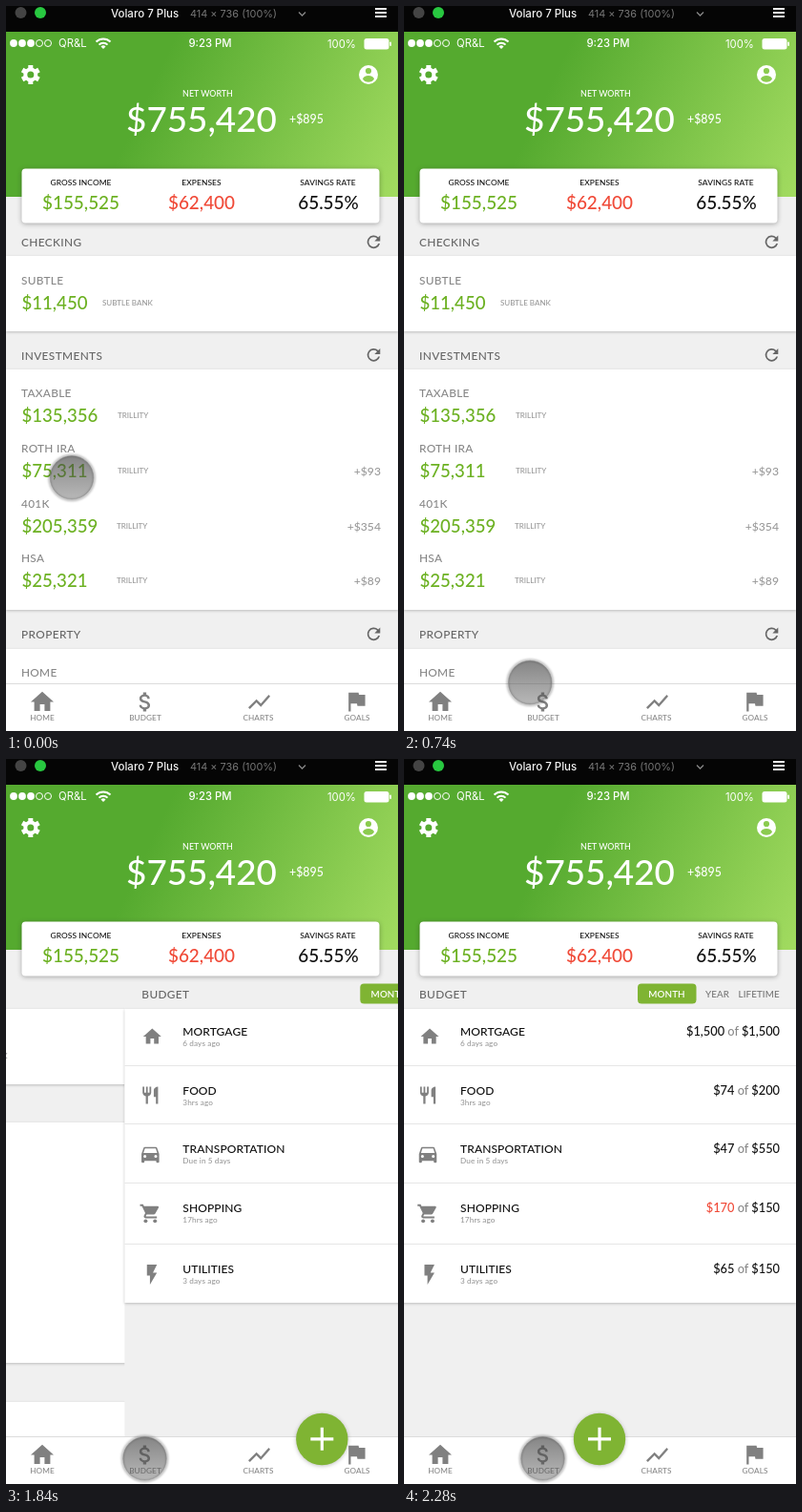
Recreate the animation shown at these times as an HTML page. Size 411 by 760 pixels, loop 3080 ms.

```html
<!DOCTYPE html>
<html lang="en">
<head>
<meta charset="utf-8">
<title>Net worth</title>
<style>
html, body { margin: 0; height: 100%; overflow: hidden; background: #fff; }
svg { display: block; width: 411px; height: 760px; font-family: Lato, "Open Sans", sans-serif; font-weight: 500; }
.sys { font-family: Inter, Roboto, sans-serif; font-size: 11.3px; font-weight: 400; }
.card { fill: #fff; filter: drop-shadow(0 1px 1.5px rgba(0,0,0,.22)); }
.head { font-size: 11.8px; letter-spacing: .4px; fill: #666; }
.name { font-size: 11.8px; letter-spacing: .3px; fill: #888; }
.sum { font-size: 18.6px; fill: #6cb122; }
.bank { font-size: 8px; fill: #999; }
.gain { font-size: 12.2px; fill: #999; text-anchor: end; }
.item { font-size: 12px; letter-spacing: .1px; fill: #111; }
.ago { font-size: 8.2px; letter-spacing: .1px; fill: #999; }
.cost { font-size: 12.8px; fill: #111; text-anchor: end; }
.tab { font-size: 9.8px; letter-spacing: .1px; fill: #777; }
.cap { font-size: 8.4px; letter-spacing: .1px; }
.mid { text-anchor: middle; }
.icon { fill: #808080; }
.nav { font-size: 8.2px; letter-spacing: .1px; fill: #888; text-anchor: middle; }
</style>
</head>
<body>
<svg viewBox="0 0 411 760">
  <defs>
    <linearGradient id="lush" gradientUnits="userSpaceOnUse" x1="160" y1="70" x2="415" y2="190">
      <stop offset="0" stop-color="#55aa2f"/><stop offset="1" stop-color="#a2db60"/>
    </linearGradient>
    <linearGradient id="press" x2="0" y2="1">
      <stop offset="0" stop-color="#404040" stop-opacity=".64"/><stop offset="1" stop-color="#555" stop-opacity=".42"/>
    </linearGradient>
    <path id="home" d="M10 20v-6h4v6h5v-8h3L12 3 2 12h3v8z"/>
    <path id="money" d="M11.8 10.9c-2.27-.59-3-1.2-3-2.15 0-1.09 1.01-1.85 2.7-1.85 1.78 0 2.44.85 2.5 2.1h2.21c-.07-1.72-1.12-3.3-3.21-3.81V3h-3v2.16c-1.94.42-3.5 1.68-3.5 3.61 0 2.31 1.91 3.46 4.7 4.13 2.5.6 3 1.48 3 2.41 0 .69-.49 1.79-2.7 1.79-2.06 0-2.87-.92-2.98-2.1h-2.2c.12 2.19 1.76 3.42 3.68 3.83V21h3v-2.15c1.95-.37 3.5-1.5 3.5-3.55 0-2.84-2.43-3.81-4.7-4.4z"/>
    <path id="chart" d="M3.5 18.5l6-6 4 4L22 6.9l-1.4-1.4-7.1 8-4-4L2 17z"/>
    <path id="flag" d="M14.4 6L14 4H5v17h2v-7h5.6l.4 2h7V6z"/>
    <path id="reload" d="M17.65 6.35A8 8 0 1 0 19.73 14h-2.08A6 6 0 1 1 16.22 7.78L13 11h7V4z"/>
    <path id="food" d="M11 9H9V2H7v7H5V2H3v7c0 2.1 1.7 3.8 3.75 4v9h2.5v-9C11.3 12.8 13 11.1 13 9V2h-2zM16 6v8h2.5v8H21V2c-2.8 0-5 2.2-5 4z"/>
    <path id="car" fill-rule="evenodd" d="M18.9 6C18.7 5.4 18.2 5 17.5 5h-11C5.8 5 5.3 5.4 5.1 6L3 12v8q0 1 1 1h1q1 0 1-1v-1h12v1q0 1 1 1h1q1 0 1-1v-8zM5 14.5a1.5 1.5 0 1 0 3 0a1.5 1.5 0 1 0-3 0zM16 14.5a1.5 1.5 0 1 0 3 0a1.5 1.5 0 1 0-3 0zM5 11l1.5-4.5h11L19 11z"/>
    <g id="cart">
      <path d="M1 2v2h2l3.6 7.6-1.35 2.45C4.5 15.4 5.5 17 7 17h12v-2H7.4q-.3-.1-.2-.4l.9-1.6h7.45q1.2 0 1.75-1L20.9 5.5Q21.3 4.2 20 4H5.2l-.9-2z"/>
      <circle cx="7" cy="20" r="2"/><circle cx="17" cy="20" r="2"/>
    </g>
    <path id="bolt" d="M7 2v11h3v9l7-12h-4l4-8z"/>
    <clipPath id="body"><rect y="200" width="411" height="511"/></clipPath>
  </defs>

  <rect width="411" height="760" fill="#f0f0f0"/>
  <g clip-path="url(#body)">
    <g id="accounts"></g>
    <g id="budget"></g>
  </g>

  <rect y="26" width="411" height="174" fill="url(#lush)"/>
  <rect width="411" height="27" fill="#050505"/>
  <g class="sys">
    <circle cx="15.500" cy="7" r="6" fill="#444"/>
    <circle cx="36" cy="7" r="6" fill="#28c840"/>
    <text x="110" y="12" fill="#f2f2f2" font-weight="500" font-size="11.5">Volaro 7 Plus</text>
    <text x="193" y="12" fill="#777" font-size="10.9">414 × 736 (100%)</text>
    <path d="M307 6.500l3.500 3.500 3.500-3.500" fill="none" stroke="#888" stroke-width="1.300"/>
    <path d="M387 3h12M387 7h12M387 11h12" stroke="#eee" stroke-width="1.800"/>
    <g fill="#fff">
      <circle cx="8" cy="39" r="3.900"/><circle cx="17" cy="39" r="3.900"/><circle cx="26" cy="39" r="3.900"/>
      <g fill="none" stroke="#fff"><circle cx="35" cy="39" r="3.500"/><circle cx="44" cy="39" r="3.500"/></g>
      <text x="55" y="43">QR&amp;L</text>
      <g fill="none" stroke="#fff" stroke-width="2">
        <path d="M94.500 37.500a10.600 10.600 0 0 1 15 0M97.500 40.600a6.500 6.500 0 0 1 9 0"/>
      </g>
      <path d="M102 45l-2.500-2.600a3.600 3.600 0 0 1 5 0z"/>
      <text class="mid" x="214" y="42.500" font-weight="500">9:23 PM</text>
      <text x="337" y="43.500">100%</text>
      <rect x="375.500" y="34" width="26" height="11.500" rx="2.500"/>
      <rect x="402.300" y="37.500" width="1.700" height="4.500" rx=".8"/>
    </g>
  </g>
  <g id="gear" transform="translate(25.800 72)" stroke="#fff" fill="none"><circle r="5.500" stroke-width="4"/></g>
  <circle cx="380" cy="72" r="10" fill="#fff"/>
  <circle cx="380" cy="68" r="3.100" fill="#8bcb4f"/>
  <path d="M374 76.500q1-3.500 6-3.500t6 3.500q-2 3.200-6 3.200t-6-3.200z" fill="#8bcb4f"/>
  <g fill="#fff">
    <text class="mid" x="211.500" y="95" font-size="8.900">NET WORTH</text>
    <text class="mid" x="205" y="132" font-size="36.800">$755,420</text>
    <text x="297" y="122.500" font-size="12.400">+$895</text>
  </g>
  <rect class="card" x="16.500" y="170.500" width="375" height="57" rx="4" style="filter:drop-shadow(0 1px 2.500px rgba(0,0,0,.32))"/>
  <g class="mid" fill="#111">
    <text class="cap" x="78.500" y="188">GROSS INCOME</text>
    <text class="cap" x="205" y="188">EXPENSES</text>
    <text class="cap" x="337.500" y="188">SAVINGS RATE</text>
    <g font-size="18.900">
      <text x="78.500" y="213" fill="#6cb122">$155,525</text>
      <text x="205" y="213" fill="#f04a38">$62,400</text>
      <text x="338" y="213">65.55%</text>
    </g>
  </g>

  <rect y="710" width="411" height="50" fill="#fff"/>
  <path d="M0 710.500h411" stroke="#dcdcdc"/>
  <g id="bar"></g>
  <g id="add">
    <circle cx="205" cy="713" r="27.200" fill="#7fb433" style="filter:drop-shadow(0 1px 2px rgba(0,0,0,.25))"/>
    <path d="M193 712.800h24M205 700.800v24" stroke="#fff" stroke-width="3.200"/>
  </g>
  <g id="touch">
    <circle r="23.500" cy=".5" fill="none" stroke="#000" stroke-opacity=".28" stroke-width="2.500" style="filter:blur(1.200px)"/>
    <circle r="22.800" cy=".3" fill="url(#press)" stroke="#888" stroke-opacity=".5"/>
  </g>
</svg>
<script>
const $ = id => document.getElementById(id);
const text = (cls, x, y, s) => `<text class="${cls}" x="${x}" y="${y}">${s}</text>`;
const card = (y, h, x = 0) => `<rect class="card" x="${x}" y="${y}" width="${411 - x}" height="${h}"/>`;
// Icons sit on a 24 unit grid and are placed by its centre.
const icon = (id, x, y, k, cls = 'icon') =>
  `<use class="${cls}" href="#${id}" transform="translate(${x} ${y}) scale(${k}) translate(-12 -12)"/>`;
const section = (title, y) => text('head', 16, y, title) + icon('reload', 385.5, y - 4.7, 0.85, 'head');

const holdings = [
  ['SUBTLE', 291.5, '$11,450', 101, 'SUBTLE BANK', ''],
  ['TAXABLE', 410, '$135,356', 117, 'TRILLITY', ''],
  ['ROTH IRA', 468, '$75,311', 117, 'TRILLITY', '+$93'],
  ['401K', 526, '$205,359', 116, 'TRILLITY', '+$354'],
  ['HSA', 583, '$25,321', 116, 'TRILLITY', '+$89']
];
$('accounts').innerHTML =
  card(262, 79) + card(381, 252) + card(674, 60) +
  section('CHECKING', 252) + section('INVESTMENTS', 370.5) + section('PROPERTY', 663) +
  holdings.map(([name, y, sum, x, bank, gain]) =>
    text('name', 16, y, name) + text('sum', 16.5, y + 26.3, sum) +
    text('bank', x, y + 22, bank) + text('gain', 393, y + 24, gain)).join('') +
  text('name', 16, 703, 'HOME');

const items = [
  ['home', 'MORTGAGE', 290, '6 days ago', '$1,500', '$1,500', 0.95, 27, 291],
  ['food', 'FOOD', 352, '3hrs ago', '$74', '$200', 0.9, 25, 352.5],
  ['car', 'TRANSPORTATION', 413, 'Due in 5 days', '$47', '$550', 1.03, 25, 414],
  ['cart', 'SHOPPING', 475, '17hrs ago', '$170', '$150', 0.98, 25, 476.5],
  ['bolt', 'UTILITIES', 539, '3 days ago', '$65', '$150', 1.05, 26.7, 540.5]
];
$('budget').innerHTML =
  '<rect x="-2" y="229" width="413" height="490" fill="#f0f0f0"/>' + card(262, 308, -2) +
  '<path d="M-2 321.5h413M-2 382.5h413M-2 444.5h413M-2 508.500h413" stroke="#e6e6e6"/>' +
  text('head', 16, 250.7, 'BUDGET') +
  '<rect x="245" y="235.500" width="61.500" height="21" rx="4" fill="#7fb433"/>' +
  '<text class="tab mid" x="275.500" y="249.800" style="fill:#fff;font-weight:600">MONTH</text>' +
  text('tab', 316, 249.7, 'YEAR') + text('tab', 350.5, 249.7, 'LIFETIME') +
  items.map(([id, name, y, ago, spent, limit, k, ix, iy]) =>
    icon(id, ix, iy, k) + text('item', 59, y, name) + text('ago', 59, y + 11, ago) +
    text('cost', 394, y, `<tspan fill="${id === 'cart' ? '#f04a38' : '#111'}">${spent}</tspan>` +
      ` <tspan fill="#888">of</tspan> ${limit}`)).join('');

$('bar').innerHTML =
  [['home', 38, 729.5, 1.2, 'HOME', 38], ['money', 146, 729.5, 1.12, 'BUDGET', 146],
   ['chart', 265.5, 729.5, 1.15, 'CHARTS', 264.5], ['flag', 367.3, 729, 1.16, 'GOALS', 368]]
    .map(([id, x, y, k, label, lx]) => icon(id, x, y, k) + text('nav', lx, 749, label)).join('');

for (let i = 0; i < 6; i++)
  $('gear').innerHTML += `<path d="M0-6v-4" stroke-width="5" transform="rotate(${i * 60})"/>`;

// Finger path: time, x, y, then velocity in px/ms.
const path = [
  [0, 69, 494, 0.03, 0.2],
  [440, 98.5, 672, 0.13, 0.19],
  [540, 113, 685.5, 0.12, 0.12],
  [1120, 145.5, 733, 0, 0]
];
function finger(t) {
  if (t >= 1120) return [145.5, 733];
  const i = path.findIndex(p => p[0] > t), a = path[i - 1], b = path[i];
  const d = b[0] - a[0], u = (t - a[0]) / d, v = 1 - u;
  return [1, 2].map(n =>
    a[n] * v * v * (1 + 2 * u) + b[n] * u * u * (3 - 2 * u) +
    d * u * v * (a[n + 2] * v - b[n + 2] * u));
}

// Critically damped spring, from one stage width to rest.
function slide(t) {
  if (t < 1740) return 411;
  if (t >= 2280) return 0;
  const s = (t - 1710) * 0.0185;
  return 411 * (1 + s) * Math.exp(-s);
}

const move = (id, x, y = 0) => $(id).setAttribute('transform', `translate(${x.toFixed(2)} ${y.toFixed(2)})`);
const start = performance.now();
function draw(now) {
  const t = Math.floor(Math.max(0, now - start) % 3080 / 20) * 20;
  const x = slide(t);
  move('accounts', (x - 411) * 0.535);
  move('budget', x);
  move('add', x);
  $('budget').style.display = $('add').style.display = x === 411 ? 'none' : '';
  move('touch', ...finger(t));
  requestAnimationFrame(draw);
}
draw(start);
</script>
</body>
</html>
```
